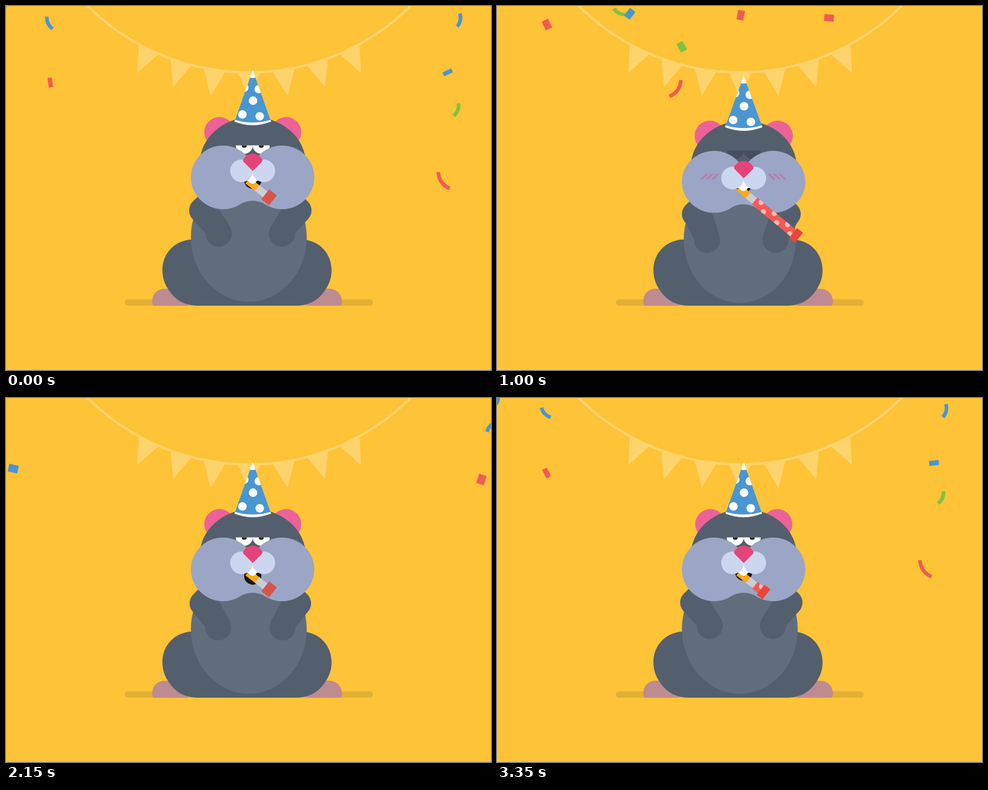
Animation of 800x600 px, one loop 3400 ms. Source, as an HTML page with a canvas:

```html
<!DOCTYPE html>
<html lang="en">
<head>
<meta charset="utf-8">
<title>Party hamster</title>
<style>
html, body { margin: 0; width: 100%; height: 100%; overflow: hidden; background: #fec337; }
canvas { display: block; }
</style>
</head>
<body>
<canvas id="stage" width="800" height="600"></canvas>
<script>
const ctx = document.getElementById('stage').getContext('2d');
const LOOP = 3400, HALF = LOOP / 2, BURST = 600, SETTLE = 1550;
const TAU = Math.PI * 2, DEG = Math.PI / 180;
const DARK = '#545f6e', BELLY = '#616d7d', CHEEK = '#9ba5c5', MUZZLE = '#cdd6f0';
const RED = '#f25a55', BLUE = '#4a96d1', GREEN = '#7dc440', WHITE = '#fff', FLAG = '#fdd46c';

// Place, speed and angle at the moment the confetti settles
const square = (color, x, y, vx, vy, angle, spin) =>
  ({ color, x, y, vx, vy, angle, spin, dragX: 1000, dragY: 350 });
const streamer = (color, x, y, vx, vy, angle, spin, len = 22, bend = 3) =>
  ({ color, x, y, vx, vy, angle, spin, len, bend, dragX: 1e4, dragY: 700 });

const CONFETTI = [
  streamer(GREEN, 84, 145, -.21, .163, 60, .06),
  square(BLUE, 91, 98, -.175, .064, -30, .37),
  square(RED, 694, 114, .2, .071, -24, -.38),
  streamer(RED, 119, 263, -.31, .153, 125, 0, 33, -5),
  streamer(BLUE, 74, 12, -.17, .056, 74, .03),
  streamer(BLUE, 696, 12, .18, .089, -10, -.36),
  streamer(BLUE, 786, -5, .1, .029, 118, -.38),
  square(RED, -64, 125, -.2, .071, 87, .37),
  square(RED, 402, 236, 0, .166, -103, -.37),
  square(GREEN, 345, 272, .055, .154, 85, .37)
];

const lerp = (a, b, k) => a + (b - a) * k;
const ramp = (t, from, to) => Math.min(1, Math.max(0, (t - from) / (to - from)));

function ease(t, from, to) {
  const k = ramp(t, from, to);
  return k * k * (3 - 2 * k);
}

function ellipse(x, y, rx, ry, color, from = 0, to = TAU) {
  ctx.fillStyle = color;
  ctx.beginPath();
  ctx.ellipse(x, y, rx, ry, 0, from, to);
  ctx.fill();
}
const circle = (x, y, r, color) => ellipse(x, y, r, r, color);

function shape(d, color) {
  ctx.fillStyle = color;
  ctx.fill(new Path2D(d));
}

function group(draw, dx = 0, dy = 0) {
  ctx.save();
  ctx.translate(dx, dy);
  draw();
  ctx.restore();
}

// Draws the mirror image, so that x lands on sum - x
function flip(sum, draw, dy = 0) {
  group(() => { ctx.scale(-1, 1); draw(); }, sum, dy);
}

function both(sum, draw) {
  draw();
  flip(sum, draw);
}

function bunting() {
  const r = 378.5;
  ctx.strokeStyle = ctx.fillStyle = FLAG;
  ctx.lineJoin = 'round';
  group(() => {
    ctx.lineWidth = 4;
    ctx.beginPath();
    ctx.arc(0, 0, r, 0, Math.PI);
    ctx.stroke();
    ctx.lineWidth = 2;
    for (let i = -3; i <= 3; i++) {
      ctx.save();
      ctx.rotate(i * 8.65 * DEG);
      ctx.beginPath();
      ctx.moveTo(-17, r);
      ctx.lineTo(17, r);
      ctx.lineTo(0, r + 41);
      ctx.closePath();
      ctx.fill();
      ctx.stroke();
      ctx.restore();
    }
  }, 401, -269);
}

// Distance covered at a speed that drag slows down
const glide = (speed, drag, t) => speed * drag * (1 - Math.exp(-t / drag));

function confetti(t) {
  const age = (t - BURST + LOOP) % LOOP + BURST - SETTLE;
  for (const p of CONFETTI) {
    group(() => {
      ctx.rotate((p.angle + p.spin * age) * DEG);
      if (p.len) {
        ctx.strokeStyle = p.color;
        ctx.lineWidth = 6;
        ctx.beginPath();
        ctx.moveTo(-p.len / 2, 0);
        ctx.quadraticCurveTo(0, 2 * p.bend, p.len / 2, 0);
        ctx.stroke();
      } else {
        const h = 10 + 3 * Math.cos(TAU * age / 300);
        ctx.fillStyle = p.color;
        ctx.fillRect(-8, -h / 2, 16, h);
      }
    }, p.x + glide(p.vx, p.dragX, age), p.y + glide(p.vy, p.dragY, age));
  }
}

function lowerBody(squeeze) {
  ctx.fillStyle = '#e2b035';
  ctx.beginPath();
  ctx.roundRect(196, 483.5, 409, 10.5, 5.2);
  ctx.fill();
  both(795, () => shape('M246 494Q241 494 241 488C241 474 250 466 263 466H300V494Z', '#bd8b90'));
  both(795, () => shape('M305 385C277 387 258 409 258 435C258 449 262 459 269 469C280 486 297 494 316 494H400V385Z', DARK));
  ellipse(400.5, 381 + 4 * squeeze, 95.5 - 3 * squeeze, 106.5 - 2 * squeeze, BELLY);
}

function arm(bend) {
  const ex = lerp(322.5, 325.5, bend), ey = lerp(337, 343, bend);
  const hx = lerp(351, 346.5, bend), hy = lerp(375.5, 385.5, bend);
  circle(ex, ey, 20.5, DARK);
  circle(hx, hy, 21.5, DARK);
  shape(`M${ex - 14.5} ${ey + 14.5}L${hx - 21} ${hy}L${hx + 20} ${hy - 9}L${ex + 29.5} ${ey - 1}` +
    `L${ex + 22} ${ey - 27}L${ex + 5} ${ey - 34}L${ex - 14.5} ${ey - 14.5}Z`, DARK);
}

function eyes(closed) {
  for (const x of [393, 421]) {
    ellipse(x, 229.7, 14, 14, closed ? '#474f5d' : '#fffef5', 0, Math.PI);
    if (!closed) ellipse(x, 229.7, 4.2, 4, '#2a2326', 0, Math.PI);
  }
}

function cheeks(squeeze) {
  const ry = 52.5 - 1.5 * squeeze;
  ellipse(358, 282.5, 53, ry, CHEEK);
  ellipse(455.5, 282.5, 53, ry, CHEEK);
  group(() => shape('M384 327.8Q395 321 407 321Q418 321 430 327.8V280H384Z', CHEEK), 0, -1.5 * squeeze);
}

function blush(alpha) {
  ctx.save();
  ctx.globalAlpha = alpha;
  ctx.strokeStyle = '#c277a8';
  ctx.lineWidth = 3;
  ctx.lineCap = 'round';
  both(813, () => {
    ctx.beginPath();
    for (let x = 338; x < 360; x += 9) {
      ctx.moveTo(x, 285);
      ctx.lineTo(x + 8, 277.5);
    }
    ctx.stroke();
  });
  ctx.restore();
}

function whistle(len, squeeze) {
  ctx.rotate((38 + 1.7 * squeeze) * DEG);
  ctx.fillStyle = '#fbaa19';
  ctx.fillRect(-7, -6, 21, 12);
  ctx.fillStyle = '#cccdd1';
  ctx.fillRect(13, -6, 17, 12);
  const rolled = len < 42;
  if (!rolled) {
    ctx.save();
    ctx.beginPath();
    ctx.rect(27, -7.2, len - 27, 14.4);
    ctx.clip();
    ctx.fillStyle = RED;
    ctx.fill();
    const pitch = 10 + len * .036;
    for (let i = 0; i < 6; i++) {
      const odd = i % 2;
      circle(37 + i * pitch - odd * 1.5, odd ? -5 + 9.5 : -5, 4.4, '#fbb9b5');
    }
    ctx.restore();
  }
  const cap = rolled ? 16 : 12.5;
  ctx.fillStyle = rolled ? '#d9534b' : '#e8463c';
  ctx.fillRect(len - cap / 2, -10.4, cap, 20.8);
}

function snout() {
  shape('M407 270L397 288H417Z', WHITE);
  circle(406.7, 285.5, 7.6, WHITE);
  circle(388.5, 271.7, 18.7, MUZZLE);
  circle(425.3, 271.7, 18.7, MUZZLE);
  shape('M407 272L392.5 257.5Q389.5 254.5 392.5 251C397 245.5 402 243.5 407 243.5C412 243.5 417 245.5 421.5 251Q424.5 254.5 421.5 257.5Z', '#e54479');
}

function hat() {
  const cone = 'M407 105.5L376.7 190.5Q407 202.5 437.3 190.5Z';
  shape(cone, WHITE);
  ctx.save();
  ctx.clip(new Path2D(cone));
  shape('M402 117.5Q407 120 412 117.5L440 186.5Q407 197.5 374 186.5Z', BLUE);
  for (const [x, y] of [[390, 178.7], [418.5, 181.8], [407.5, 156], [393, 134.5], [417, 137]]) circle(x, y, 7, WHITE);
  ctx.restore();
}

function hamster(t) {
  const calm = 1 - ease(t, 1250, 1530), retract = 1 - ramp(t, 1165, HALF);
  const head = ease(t, 450, 640) * calm;
  const squeeze = ease(t, 500, 1000) * calm;
  const gape = ease(t, 100, 450) * (1 - ease(t, 650, 1000));
  const bend = ease(t, 250, 850) * (1 - ease(t, 1165, HALF));
  const reach = ease(t, 480, 740) * retract;
  const drop = 9 * head + 3 * squeeze;

  lowerBody(squeeze);
  both(806, () => arm(bend));
  group(() => {
    both(814, () => circle(352 - head, 208, 25, '#ec6297'));
    ellipse(407, 259, 87.3, 76, DARK, Math.PI, TAU);
    ctx.fillRect(350, 258, 114, 12);
  }, 0, 6 * head);
  group(() => eyes(head > .5), 0, 8.5 * head);
  group(() => cheeks(squeeze), 0, 7.3 * head);
  blush(head);
  circle(407, 287 + drop + 6.5 * gape - 6 * squeeze, 14.2, '#141414');
  group(() => whistle(38 + 78 * reach, squeeze), 404, 292 + drop);
  group(snout, 0, drop);
  group(() => {
    ctx.scale(1 + .02 * head, 1);
    ctx.translate(-407, 0);
    hat();
  }, 407, 9.2 * head);
}

const start = performance.now();

function frame() {
  const t = (performance.now() - start) % LOOP;
  ctx.fillStyle = '#fec337';
  ctx.fillRect(0, 0, 800, 600);
  bunting();
  confetti(t);
  flip(795, () => confetti((t + HALF) % LOOP), 3.5);
  hamster(t % HALF);
  requestAnimationFrame(frame);
}
frame();
</script>
</body>
</html>
```
